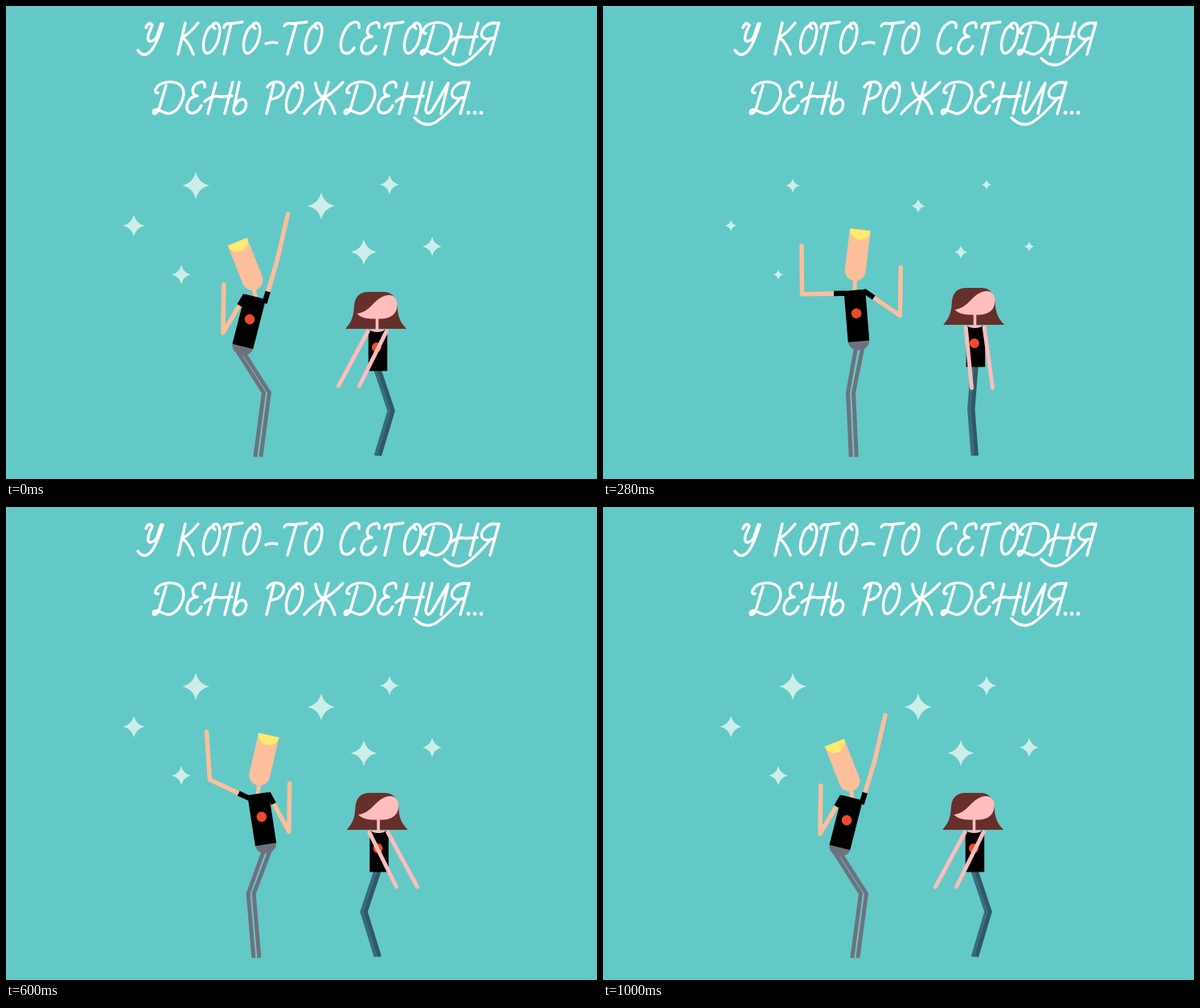
Write an HTML page with a canvas that moves like this. It is 735 px wide and 589 px high and loops after 1040 ms.

```html
<!DOCTYPE html>
<html lang="ru">
<head>
<meta charset="utf-8">
<title>У кого-то сегодня день рождения...</title>
<style>
html, body { margin: 0; width: 100%; height: 100%; overflow: hidden; background: #63c9c6; }
canvas { display: block; }
</style>
</head>
<body>
<canvas id="stage" width="735" height="589" role="img" aria-label="У кого-то сегодня день рождения..."></canvas>
<script>
const ctx = document.getElementById('stage').getContext('2d');
const LOOP = 1040, HALF = LOOP / 2, STEP = 40, RAD = Math.PI / 180;
const SKIN = '#fbbf9b', PINK = '#ffbdbe', GREY = '#6d727f', RED = '#ef4a2c';

// Hand lettering: advance and pen strokes relative to the baseline
const glyphs = {
  У: [29, 'M10 -33Q14 -42 18 -36Q9 -18 15 -16Q23 -15 31 -38Q22 -8 14 -2Q6 4 0 -5M29 -38L24 -23'],
  К: [31, 'M10 -39L1 0M26 -39Q14 -24 6 -21Q14 -16 20 0'],
  О: [24, 'M14 -36C4 -34 -1 -12 3 -3C8 4 19 -10 21 -22C24 -36 19 -41 14 -38Q11 -35 16 -32'],
  Г: [26, 'M3 -33Q4 -39 11 -38L26 -40M12 -38L3 0'],
  '-': [26, 'M5 -13Q12 -16 19 -14'],
  Т: [27, 'M2 -35Q4 -40 13 -38L30 -40M17 -38L6 0'],
  С: [25, 'M24 -33Q25 -41 18 -40C6 -37 -2 -14 3 -4C7 2 15 -2 18 -8'],
  Е: [28, 'M24 -33Q25 -41 18 -39C8 -37 6 -23 15 -22C4 -22 -1 -8 4 -2C10 2 17 -3 20 -10'],
  Д: [38, 'M14 -35L6 -8C3 2 -4 2 -1 -4C3 -8 10 0 18 0C30 -2 40 -22 34 -33C28 -42 6 -42 1 -30Q0 -25 4 -26'],
  Н: [31, 'M10 -38L0 0M-4 -15Q6 -24 16 -21L30 -22M31 -39L21 0'],
  Я: [25, 'M26 -39L15 0M26 -38C12 -42 2 -30 5 -22Q10 -16 21 -21M16 -20Q-2 2 -16 11Q-30 18 -42 5'],
  Ь: [22, 'M8 -39L1 -5Q1 1 8 0C16 -2 20 -14 13 -18Q6 -18 3 -10'],
  Р: [23, 'M9 -37L0 0M1 -33Q6 -41 16 -39C26 -36 22 -20 6 -18'],
  Ж: [52, 'M14 -38Q16 -23 24 -20Q12 -14 0 0M30 -39L19 0M48 -39Q34 -24 24 -20Q32 -18 38 0'],
  И: [30, 'M10 -39L2 -6Q3 4 10 -4L30 -38L21 0'],
  '.': [8, 'M0 -1L.1 -1'],
  ' ': [20, '']
};

// x, y, large radius
const stars = [[236, 223.5, 17], [392, 249, 17], [477, 222.5, 12], [159, 273.5, 13.5],
  [445, 306.5, 16], [530, 299.5, 12], [218, 334.5, 12]];

const girlHair = new Path2D('M423 397C430 389 433 382 433.5 371Q434 351 452 351L470 351Q485 351 487.5 368C488 382 491 389 499 397Z');
const girlFace = new Path2D('M437 378C451 377 457 364 467 358Q475 353 482 356Q488 360 487.5 368Q486 384 467 384.5L455 384.5Q443 384 437 378Z');

function line(points, color, width, cap = 'butt') {
  ctx.beginPath();
  points.forEach(p => ctx.lineTo(...p));
  ctx.strokeStyle = color;
  ctx.lineWidth = width;
  ctx.lineCap = cap;
  ctx.lineJoin = cap === 'round' ? 'round' : 'miter';
  ctx.stroke();
}

function oval(x, y, rx, ry, color, end = 2 * Math.PI) {
  ctx.beginPath();
  ctx.ellipse(x, y, rx, ry, 0, 0, end);
  ctx.fillStyle = color;
  ctx.fill();
}

function box(x, y, w, h, color) {
  ctx.fillStyle = color;
  ctx.fillRect(x, y, w, h);
}

function at(x, y, degrees, draw) {
  ctx.save();
  ctx.translate(x, y);
  ctx.rotate(degrees * RAD);
  draw();
  ctx.restore();
}

function write(text, x, y) {
  ctx.strokeStyle = '#fff';
  ctx.lineCap = ctx.lineJoin = 'round';
  for (const c of text) {
    const [advance, path] = glyphs[c];
    ctx.lineWidth = c === '.' ? 4.8 : 3.5;
    at(x, y, 0, () => ctx.stroke(new Path2D(path)));
    x += advance;
  }
}

function drawStar(x, y, r) {
  const c = r * .19;
  ctx.beginPath();
  ctx.moveTo(x, y - r);
  ctx.quadraticCurveTo(x + c, y - c, x + r, y);
  ctx.quadraticCurveTo(x + c, y + c, x, y + r);
  ctx.quadraticCurveTo(x - c, y + c, x - r, y);
  ctx.quadraticCurveTo(x - c, y - c, x, y - r);
  ctx.fillStyle = '#cceeea';
  ctx.fill();
}

// Smooth curve through the given values at the given times
function curve(times, values, t) {
  return values.reduce((sum, v, i) => sum + times.reduce(
    (w, b, j) => i === j ? w : w * (t - b) / (times[i] - b), v), 0);
}

// The second half of the loop mirrors the first; lean runs from 1 (right) to -1 (left)
function drawMan(t) {
  const dir = t < 480 ? 1 : -1;
  const end = dir > 0 ? 440 : 480;
  const time = Math.max(0, Math.min(end, dir > 0 ? t : t - HALF));
  const ease = values => curve([0, 200, 360, end], values, time);
  const lean = dir * ease([1, .02, -.66, -1]);
  const lowering = ease([-73.5, 19, 46, 59.3]);
  const raising = ease([59.3, 31, -35, -73]);

  const bend = Math.abs(lean) ** 1.2;
  const x = 312.2 - 2 * lean, y = 351 + 11 * bend, tilt = 14.3 * lean;
  const hx = 312 - 5.5 * lean, hy = 325 + 16 * bend;
  const cos = Math.cos(tilt * RAD), sin = Math.sin(tilt * RAD);
  const body = (u, v) => [x + u * cos - v * sin, y + u * sin + v * cos];

  for (const side of [-1, 1]) {
    const hip = body(side * 4.2, 72);
    const knee = 312 + 12 * lean, foot = 312.2 + 1.2 * lean;
    line([hip, [knee + side * 3.5, 481.5], [foot + side * 3.5, 561.5]], GREY, 5);
  }
  line([[hx, hy], [x, y + 1]], SKIN, 5);

  for (const side of [-1, 1]) {
    const arm = (side === dir ? lowering : raising) * RAD;
    const fore = 12.3 * Math.max(0, side * lean) ** 2 * RAD;
    const start = body(side * 13, 3);
    const along = d => [start[0] + side * d * Math.cos(arm), start[1] + d * Math.sin(arm)];
    const elbow = along(52.6);
    const hand = [elbow[0] + side * 60 * Math.sin(fore) + .8, elbow[1] - 60 * Math.cos(fore)];
    line([start, elbow, hand], SKIN, 5.5, 'round');
    line([along(-2), along(13)], '#000', 6.5);
  }

  at(x, y, tilt, () => {
    oval(0, 64, 13, 11, GREY, Math.PI);
    box(-13.3, 0, 26.6, 64, '#000');
    oval(0, 29, 6.3, 6.3, RED);
  });
  at(hx, hy, -21.5 * lean, () => {
    box(-13, -51, 26, 51.5, SKIN);
    oval(0, 0, 13, 13, SKIN, Math.PI);
    oval(0, -51, 13, 12.5, '#ffe96f', Math.PI);
  });
}

// sway: 1 is far left, -1 far right; dip: 1 when crouching
function drawGirl(sway, dip) {
  const dx = -.8 * sway, dy = 5 * dip;
  for (const [off, color] of [[-2.2, '#3a6c7b'], [2.3, '#305867']])
    line([[462 + off, 448 + dy], [462 + 17 * sway + off, 502 + 2 * dip], [462.3 + off, 560]], color, 4.9);
  at(dx, dy, 0, () => {
    ctx.fillStyle = '#662f2b';
    ctx.fill(girlHair);
    ctx.fillStyle = PINK;
    ctx.fill(girlFace);
    box(451.5, 398, 23.5, 51.5, '#000');
    oval(462.3, 398, 9, 3, PINK, Math.PI);
    line([[462.3, 383], [462.3, 400]], PINK, 3.6);
    oval(461.7, 420, 6, 6, RED);
  });
  for (const side of [-1, 1])
    line([[462.5 + side * 11.5 + dx, 400 + dy], [462.5 + side * 13 - 36 * sway, 475.5 - 2.5 * dip]], PINK, 5, 'round');
}

function draw(now) {
  const t = Math.floor(now % LOOP / STEP) * STEP;
  const beat = Math.floor((t + 90) / (LOOP / 6)) % 6;
  const swing = Math.cos(beat * Math.PI / 3);
  const accent = beat % 3 === 0;

  box(0, 0, 735, 589, '#63c9c6');
  write('У КОГО-ТО СЕГОДНЯ', 164, 60);
  write('ДЕНЬ РОЖДЕНИЯ...', 185, 134);
  for (const [x, y, r] of stars) drawStar(x, y, accent ? r : r * .52);
  drawMan(t);
  drawGirl(swing * Math.abs(swing), accent ? 1 : 0);
}

const begin = performance.now();
function tick() {
  draw(performance.now() - begin);
  requestAnimationFrame(tick);
}
tick();
</script>
</body>
</html>
```
